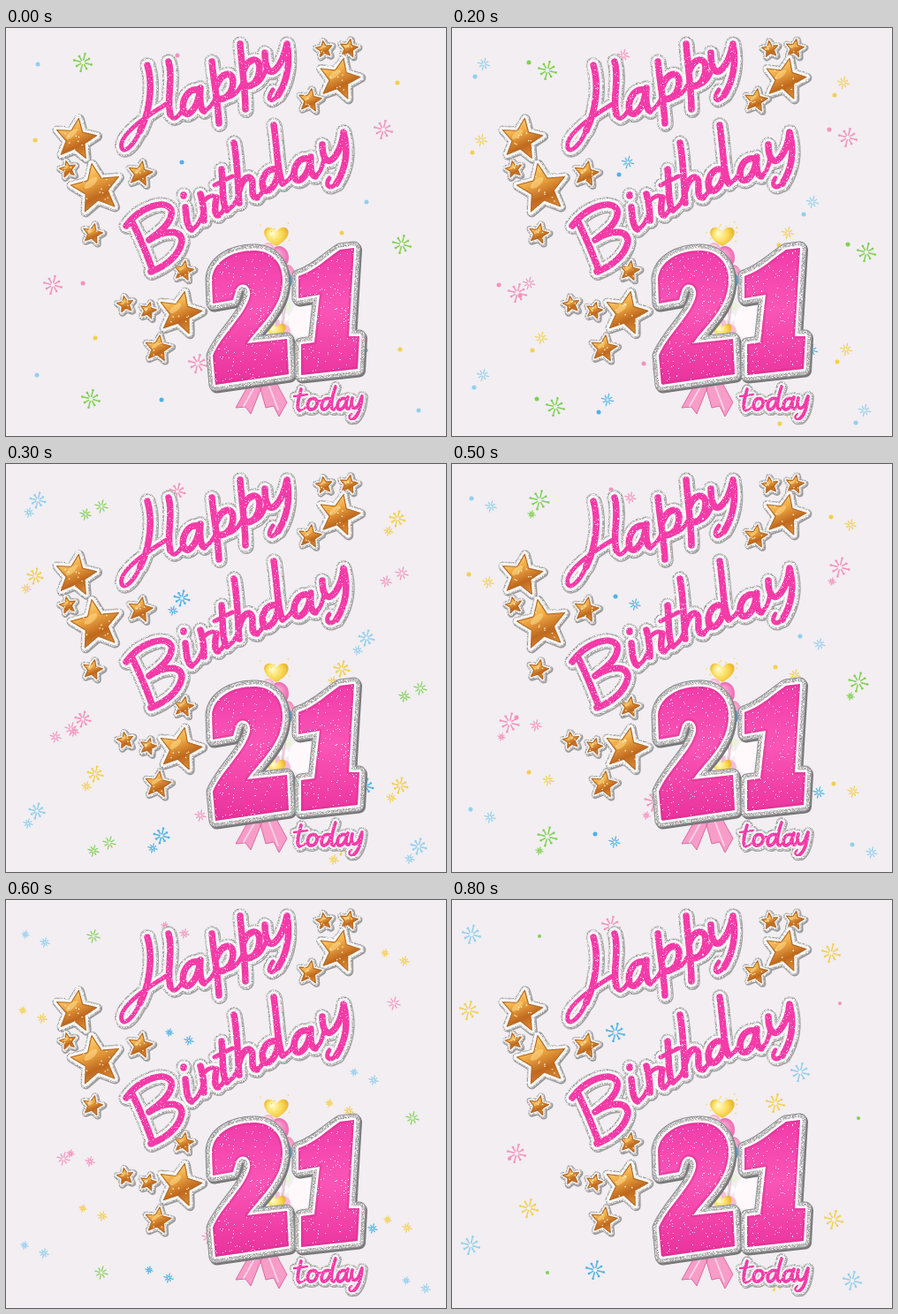
These frames come from a looping animation (498 by 462 pixels, 0.9 s). An HTML page with a canvas:

```html
<!DOCTYPE html>
<html lang="en">
<head>
<meta charset="utf-8">
<title>Happy Birthday 21 today</title>
<style>
html, body { margin: 0; width: 100%; height: 100%; overflow: hidden; background: #f2eef2; }
canvas { display: block; }
</style>
</head>
<body>
<canvas id="stage" width="498" height="462" role="img" aria-label="Happy Birthday 21 today"></canvas>
<script>
const ctx = document.getElementById('stage').getContext('2d');
const STEP = 100, STEPS = 9;

function seeded(seed) {
  let s = seed * 7919 + 12345;
  return () => {
    s = (s + 0x6D2B79F5) | 0;
    let t = Math.imul(s ^ (s >>> 15), 1 | s);
    t = (t + Math.imul(t ^ (t >>> 7), 61 | t)) ^ t;
    return ((t ^ (t >>> 14)) >>> 0) / 4294967296;
  };
}

// A tile of one-pixel specks on a base colour; base may be null
function glitter(base, specks, count, seed) {
  const tile = document.createElement('canvas');
  tile.width = tile.height = 96;
  const g = tile.getContext('2d'), rnd = seeded(seed);
  if (base) { g.fillStyle = base; g.fillRect(0, 0, 96, 96); }
  for (let i = 0; i < count; i++) {
    g.fillStyle = specks[i % specks.length];
    g.fillRect(rnd() * 96 | 0, rnd() * 96 | 0, 1, 1);
  }
  return ctx.createPattern(tile, 'repeat');
}

const looks = [1, 2, 3].map(seed => ({
  silver: glitter('#bcbcbc', ['#f4f4f4', '#989898', '#d8d8d8'], 5200, seed),
  white: glitter('#f8f7f8', ['#dcdcdc', '#ffffff'], 1500, seed + 10),
  pink: glitter('#f43ca8', ['#ff86cf', '#e22c94', '#ffc6e8'], 900, seed + 20),
  dust: glitter(null, ['#ffffffdd', '#ffd0ec'], 190, seed + 30)
}));

// Confetti
const BLUE = '#4fb2e6', PALE = '#93cfee', YELLOW = '#f4cf50', GREEN = '#80d052', PINK = '#f592bd';
// Each spot: offset x, y, then radius by step
const spotsA = [
  [0, 0, { 5: 2.5, 6: 4, 7: 6, 8: 9.5 }],
  [14, 2, { 0: 2.5, 1: 4, 2: 6.5, 3: 8 }],
  [4, 16, { 2: 2.5, 3: 5, 4: 9.5 }],
  [22, 9, { 4: 3.5, 5: 6, 6: 5 }]
];
const spotsB = [
  [-12, -2, { 0: 9.5, 1: 6, 2: 2.5 }],
  [9, 7, { 1: 6, 2: 9.5, 3: 7, 4: 4 }],
  [-9, 16, { 3: 6, 4: 9.5, 5: 4 }],
  [0, 0, { 4: 0, 5: 10, 6: 7, 7: 4, 8: 2 }]
];
const confetti = [
  [spotsA, PALE, [[22, 39], [394, 195], [21, 391], [453, 431]]],
  [spotsA, BLUE, [[185, 150], [162, 419], [393, 363]]],
  [spotsA, YELLOW, [[19, 125], [429, 60], [87, 349], [432, 362], [366, 230], [367, 432]]],
  [spotsA, PINK, [[180, 29], [73, 287]]],
  [spotsB, GREEN, [[99, 41], [460, 247], [108, 422]]],
  [spotsB, PINK, [[439, 117], [65, 293], [229, 382]]]
];

function burst(x, y, r, color) {
  ctx.strokeStyle = ctx.fillStyle = color;
  if (r < 3) { disc(x, y, r, color); return; }
  ctx.lineWidth = r > 7 ? 1.5 : 1.2;
  ctx.beginPath();
  for (let i = 0; i < 8; i++) {
    const a = i * Math.PI / 4 + 0.25, len = r * (i % 2 ? 0.85 : 1.05);
    const c = Math.cos(a), s = Math.sin(a);
    ctx.moveTo(x + c * r * 0.3, y + s * r * 0.3);
    ctx.lineTo(x + c * len, y + s * len);
    if (r > 7) ctx.rect(x + c * len - 0.5, y + s * len - 0.5, 1, 1);
  }
  ctx.stroke();
}

function drawConfetti(step) {
  for (const [spots, color, anchors] of confetti)
    for (const [x, y] of anchors)
      for (const [dx, dy, radii] of spots)
        if (radii[step]) burst(x + dx, y + dy, radii[step], color);
}

// Shared shapes
function disc(x, y, r, color, ry = r) {
  ctx.fillStyle = color;
  ctx.beginPath();
  ctx.ellipse(x, y, r, ry, 0, 0, 7);
  ctx.fill();
}

function outline(path, width, style) {
  ctx.lineWidth = width;
  ctx.strokeStyle = style;
  ctx.stroke(path);
}

function balloon(x, y, rx, ry, light, dark) {
  const g = ctx.createRadialGradient(x - rx * .3, y - ry * .4, 1, x, y, ry);
  g.addColorStop(0, light);
  g.addColorStop(1, dark);
  disc(x, y, rx, g, ry);
}

function heart(x, y, s) {
  const g = ctx.createRadialGradient(x - s * .4, y - s * .3, 1, x, y, s * 1.2);
  g.addColorStop(0, '#fffbc8');
  g.addColorStop(.5, '#fbdc58');
  g.addColorStop(1, '#e6a925');
  ctx.fillStyle = g;
  ctx.beginPath();
  ctx.moveTo(x, y + s * .85);
  ctx.bezierCurveTo(x - s * 1.9, y - s * .2, x - s * .8, y - s * 1.4, x, y - s * .45);
  ctx.bezierCurveTo(x + s * .8, y - s * 1.4, x + s * 1.9, y - s * .2, x, y + s * .85);
  ctx.fill();
}

function drawBalloons(step) {
  const rnd = seeded(5), blush = ['#ffffff', '#fff4f8', '#fbd5e5', '#f7bdd6', '#e8f3d8'];
  for (let i = 0; i < 42; i++)
    disc(262 + rnd() * 90, 310 + rnd() * 52, 4 + rnd() * 6, blush[i % 5]);
  disc(338, 332, 18, '#fff9fb', 20);
  ctx.strokeStyle = '#dcb0c4';
  ctx.lineWidth = 1;
  ctx.stroke(new Path2D('M306 248 Q318 300 311 350 M318 294 Q316 320 312 350'));
  balloon(309, 260, 11, 13, '#ffb0da', '#ec62ad');
  balloon(297, 251, 7, 8, '#ffe4f0', '#f7a5cf');
  balloon(318, 279, 9, 11, '#ffc3df', '#f283b8');
  balloon(318, 286, 6, 9, '#74cdf5', '#258fd0');
  balloon(273, 313, 9, 12, '#e6fad0', '#9bd473');
  heart(306, 236, 13);
  heart(306, 343, 10);
  const spark = seeded(60 + step % 3);
  for (let i = 0; i < 12; i++)
    disc(287 + spark() * 36, 219 + spark() * 27, .8, '#f4d55b');

  ctx.fillStyle = '#f79dc8';
  const ribbon = new Path2D('M274 405 L260 430 L271 429 L277 437 L290 405 Z ' +
    'M287 405 L294 430 L303 428 L309 440 L318 424 L306 402 Z');
  ctx.fill(ribbon);
  outline(ribbon, 1, '#dc6aa5');
  outline(new Path2D('M281 407 L269 428 M298 406 L308 432'), 2, '#fcd0e5');
}

// Stars: x, y, radius, tilt in degrees
const stars = [
  [79, 126, 25, 8], [102, 182, 30, -10], [70, 160, 10, -12], [152, 165, 15, 10],
  [98, 233, 12, 12], [360, 24, 10, -8], [388, 23, 11, 10], [377, 58, 25, 12],
  [344, 82, 14, 8], [201, 275, 12, 10], [135, 313, 10, -10], [161, 320, 10, 14],
  [197, 323, 26, 12], [172, 363, 16, 8]
];

function starPath(r, tilt) {
  const p = new Path2D();
  for (let i = 0; i < 10; i++) {
    const a = (tilt - 90 + i * 36) * Math.PI / 180, d = i % 2 ? r * .46 : r;
    p.lineTo(Math.cos(a) * d, Math.sin(a) * d);
  }
  p.closePath();
  return p;
}

function drawStars(look, step) {
  const rnd = seeded(40 + step % 3);
  for (const [x, y, r, tilt] of stars) {
    const path = starPath(r * .96, tilt), rim = r > 20 ? 10 : 7;
    ctx.save();
    ctx.translate(x, y);
    ctx.save();
    ctx.translate(1, 1);
    outline(path, rim + 1, '#9b9b9b');
    ctx.restore();
    outline(path, rim, look.silver);
    outline(path, rim - 3, look.white);
    const gold = ctx.createLinearGradient(-r * .5, -r, r * .4, r);
    gold.addColorStop(0, '#ffe58a');
    gold.addColorStop(.35, '#efaa45');
    gold.addColorStop(.65, '#bf681e');
    gold.addColorStop(1, '#e89b3c');
    ctx.fillStyle = gold;
    ctx.fill(path);
    outline(path, 1.2, '#b56a25');
    ctx.globalAlpha = .5;
    ctx.fillStyle = '#ffdf92';
    ctx.beginPath();
    ctx.ellipse(-r * .2, -r * .22, r * .3, r * .13, -.7, 0, 7);
    ctx.fill();
    ctx.globalAlpha = 1;
    for (let i = 0; i < r / 3; i++)
      disc((rnd() - .5) * r, (rnd() - .5) * r, .8, '#fff3c8');
    ctx.restore();
  }
}

// Script lettering: heavy strokes, hairlines and their widths
const words = [
  {
    heavy: 'M160 42 C166 62 164 92 152 116 M184 38 C190 58 181 80 186 98 ' +
      'M218 70 C206 68 198 82 201 94 C205 103 216 92 219 74 M220 68 C219 80 220 92 224 94 ' +
      'M233 38 C235 60 240 85 241 108 M238 66 C244 50 256 48 257 60 C257 74 248 82 241 80 ' +
      'M265 18 C267 45 271 70 271 92 M269 48 C274 34 286 32 287 44 C287 58 279 68 272 65 ' +
      'M293 28 C293 45 298 55 306 46 C313 38 316 28 318 18 C322 40 318 60 308 76',
    fine: 'M152 116 C144 134 134 142 131 136 C127 124 148 106 185 84 M186 98 Q190 108 199 94 ' +
      'M224 94 Q231 92 238 78 M250 79 Q260 78 268 62 M278 65 Q288 64 294 48 ' +
      'M308 76 C300 87 294 80 302 70',
    width: 7.5, thin: 5, rim: 10
  },
  {
    heavy: 'M143 220 C153 240 160 258 166 274 ' +
      'M136 224 C150 204 180 192 187 206 C190 220 172 232 162 240 C180 228 200 228 199 242 C196 258 180 270 164 276 ' +
      'M203 203 C204 215 205 226 210 228 M201 189 L201 190 M220 188 C224 200 224 210 224 218 ' +
      'M238 192 C236 204 236 212 240 212 M244 160 C246 180 244 200 250 206 ' +
      'M258 130 C262 150 262 175 264 198 M264 184 C268 168 278 164 279 176 C279 186 278 192 284 192 ' +
      'M306 160 C294 158 288 172 291 182 C296 190 306 178 308 164 M303 110 C307 135 307 165 313 176 ' +
      'M342 148 C330 146 324 160 327 170 C332 178 342 166 344 152 M345 146 C344 160 346 168 350 168 ' +
      'M358 132 C358 148 364 156 372 146 C378 138 381 130 382 118 C388 140 384 160 374 176',
    fine: 'M210 228 Q217 226 222 212 M222 198 Q232 186 238 192 M240 212 Q246 210 248 200 ' +
      'M236 178 L256 168 M250 206 Q257 204 262 192 M284 192 Q290 188 293 180 ' +
      'M313 176 Q321 174 326 162 M350 168 Q357 164 360 148 M374 176 C366 184 360 178 366 170',
    width: 7.5, thin: 5, rim: 10
  },
  {
    heavy: 'M334 409 C331 420 328 430 332 433 M350 420 C342 416 338 432 345 432 C352 432 355 421 349 420 ' +
      'M367 420 C358 416 354 432 360 432 C364 432 367 425 368 420 M373 406 C369 418 366 432 371 432 ' +
      'M385 420 C376 416 372 432 378 432 C382 432 385 425 386 420 M387 418 C384 426 384 432 388 431 ' +
      'M392 419 C389 430 394 434 399 427 L403 417 C402 428 399 438 394 442',
    fine: 'M326 417 L341 415 M332 433 Q338 433 342 425 M351 423 L356 422 M371 432 L376 427 ' +
      'M388 431 L392 424 M394 442 C389 445 386 440 391 437',
    width: 3.8, thin: 2.4, rim: 8
  }
].map(w => ({ ...w, heavy: new Path2D(w.heavy), fine: new Path2D(w.fine) }));

function drawWord(word, look) {
  const layer = (extra, style) => {
    outline(word.fine, word.thin + extra, style);
    outline(word.heavy, word.width + extra, style);
  };
  ctx.save();
  ctx.translate(1, 1.2);
  layer(word.rim, '#a2a2a2');
  ctx.restore();
  layer(word.rim, look.silver);
  layer(word.rim - 4, look.white);
  layer(0, look.pink);
}

// Large numerals
const digits = [
  'M233 284 C235 263 258 251 283 252 C311 254 319 281 309 307 C300 328 284 341 273 357 ' +
    'L318 352 L320 392 L237 404 L234 371 C243 348 271 325 276 303 C278 289 263 286 260 298 L257 308 L234 312 Z',
  'M331 281 C350 275 364 260 378 251 L394 249 L388 349 L400 349 L398 386 L334 393 L334 358 L349 356 L355 302 L331 306 Z'
].map(d => new Path2D(d));

function drawDigit(path, look) {
  ctx.save();
  ctx.translate(1.5, 2);
  outline(path, 15, '#777');
  ctx.restore();
  outline(path, 15, '#8e8e8e');
  outline(path, 13, look.silver);
  outline(path, 5, '#ffffff');
  const g = ctx.createLinearGradient(0, 250, 0, 402);
  g.addColorStop(0, '#f13ca9');
  g.addColorStop(.45, '#fa55b6');
  g.addColorStop(1, '#ea329d');
  ctx.fillStyle = g;
  ctx.fill(path);
  ctx.save();
  ctx.clip(path);
  outline(path, 5, '#d42d8b66');
  ctx.restore();
  ctx.fillStyle = look.dust;
  ctx.fill(path);
}

function draw(step) {
  const look = looks[step % 3];
  ctx.fillStyle = '#f2eef2';
  ctx.fillRect(0, 0, 498, 462);
  ctx.lineCap = ctx.lineJoin = 'round';
  drawConfetti(step);
  drawBalloons(step);
  drawStars(look, step);
  drawWord(words[0], look);
  drawWord(words[1], look);
  digits.forEach(d => drawDigit(d, look));
  drawWord(words[2], look);
}

let shown = -1;
function tick() {
  const step = Math.floor(performance.now() / STEP) % STEPS;
  if (step !== shown) draw(shown = step);
  requestAnimationFrame(tick);
}
tick();
</script>
</body>
</html>
```
